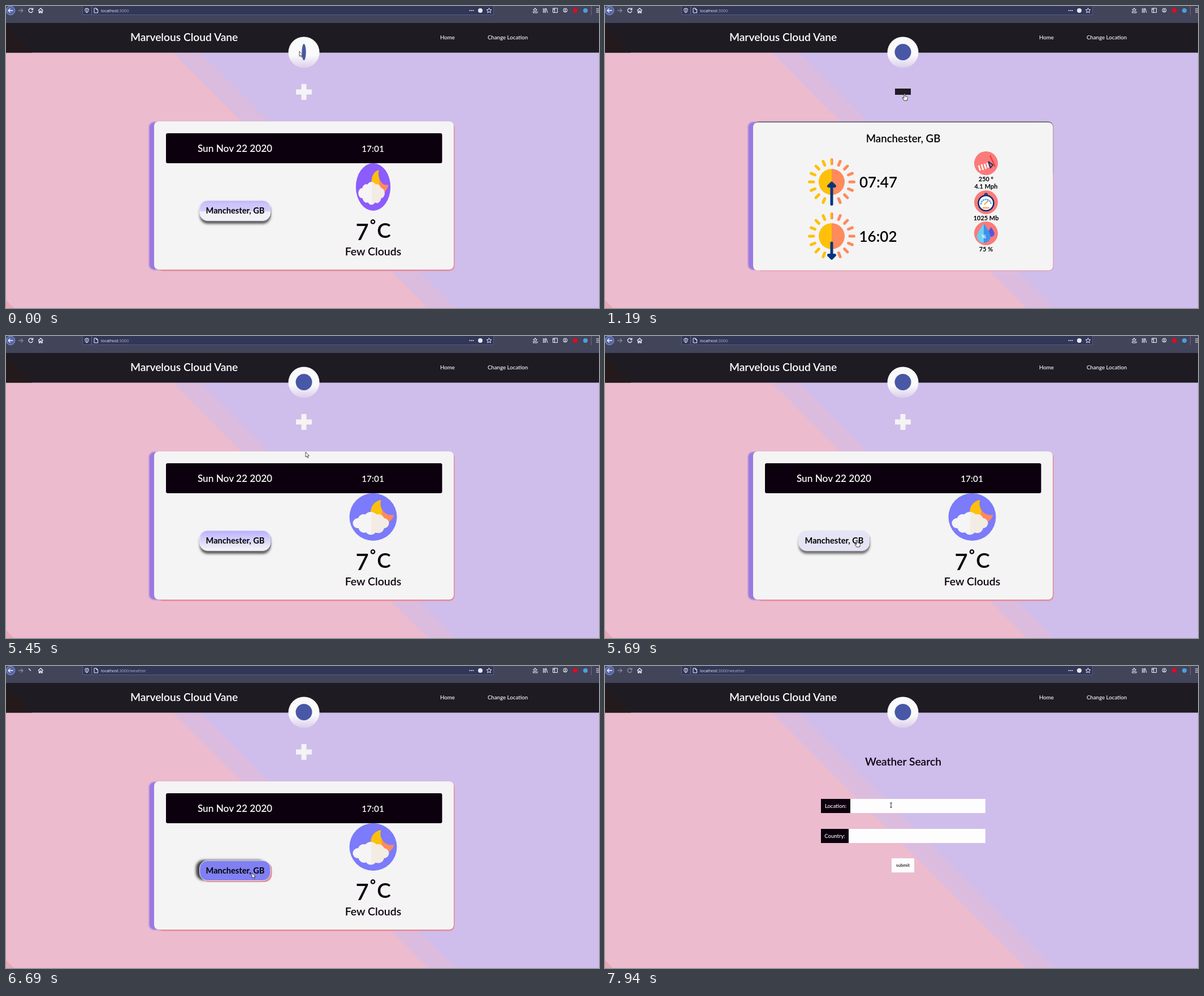
Write an HTML page that moves like this. It is 1049 px wide and 534 px high and loops after 8 s.

```html
<!DOCTYPE html>
<html lang="en">
<head>
<meta charset="utf-8">
<title>Weather app</title>
<style>
  html, body { margin: 0; width: 100%; height: 100%; overflow: hidden; background: #cfbdeb; }
  svg { display: block; width: 1049px; height: 534px; font: 600 11px Lato, sans-serif; }
  text { text-anchor: middle; white-space: pre; }
  .left { text-anchor: start; }
  .line { fill: none; stroke: #f4f4fa; stroke-width: 1.3; stroke-linejoin: round; }
  .bold { font-weight: 700; }
</style>
</head>
<body>
<svg viewBox="0 0 1049 534">
  <defs>
    <linearGradient id="disc" x2="0" y2="1">
      <stop offset=".6" stop-color="#fafafa"/><stop offset="1" stop-color="#dacdec"/>
    </linearGradient>
    <linearGradient id="fadeShort" x2="0" y2="1">
      <stop stop-color="#bdb3fa"/><stop offset=".15" stop-color="#cbc3fb"/>
      <stop offset=".5" stop-color="#d3ccfa"/><stop offset=".58" stop-color="#f2f1f6"/>
    </linearGradient>
    <linearGradient id="fadeLong" x2="0" y2="1">
      <stop stop-color="#b9b0ff"/><stop offset=".9" stop-color="#f2f1f5"/>
    </linearGradient>
    <linearGradient id="moonFill" gradientUnits="userSpaceOnUse" x1="15" x2="15.1" y1="0" y2="0">
      <stop stop-color="#ffbf0b"/><stop offset="1" stop-color="#ff8a5c"/>
    </linearGradient>
    <linearGradient id="cloudFill" gradientUnits="userSpaceOnUse" x1="-4" x2="-3.9" y1="0" y2="0">
      <stop stop-color="#f5f5f5"/><stop offset="1" stop-color="#f3ece4"/>
    </linearGradient>
    <linearGradient id="sunFill" gradientUnits="userSpaceOnUse" x1="0" x2=".1" y1="0" y2="0">
      <stop stop-color="#ffc00a"/><stop offset="1" stop-color="#ff8a5c"/>
    </linearGradient>
    <filter id="soft" x="-20%" y="-40%" width="140%" height="180%"><feGaussianBlur stdDeviation="2"/></filter>
    <filter id="softer"><feGaussianBlur stdDeviation="1"/></filter>
    <g id="sun" fill="url(#sunFill)" stroke="url(#sunFill)">
      <circle r="23" stroke="none"/>
      <path id="rays" stroke-width="5" stroke-linecap="round"/>
    </g>
  </defs>

  <!-- striped backdrop -->
  <path fill="#cfbdeb" d="M0 0H1049V534H0Z"/>
  <path fill="#dcbcde" d="M0 30H291L795 534H0Z"/>
  <path fill="#ecbbce" d="M0 30H242L746 534H0Z"/>
  <path fill="#e8a8b5" d="M0 520L14 534H0Z"/>

  <!-- browser bar -->
  <path fill="#42445a" d="M0 0H1049V30H0Z"/>
  <path fill="#333757" stroke="#555b8c" d="M135.5-1H862.5V15.5H135.5Z"/>
  <circle cx="8" cy="8" r="7.8" fill="#5666a5" stroke="#8795d8"/>
  <g class="line">
    <path d="M12.5 8H4M7.5 4.5L4 8L7.5 11.5"/>
    <path stroke="#85879a" d="M22 8H30M26.5 4.5L30 8L26.5 11.5"/>
    <path id="reload" d="M46.5 5.2A3.7 3.7 0 1 0 47.5 8.5M47.6 3.5V6.5H44.6"/>
    <path id="spinner" d="M40 4.5L44 8.5"/>
    <path d="M57 8L61.3 4L65.6 8M58.5 8V12H60.3V9H62.3V12H64.2V8"/>
    <g stroke-width="1">
      <path d="M140 5L143 4L146 5V8Q145.500 10.500 143 12Q140.500 10.500 140 8ZM143 5V11"/>
      <path stroke="#666b99" d="M151.500 0V15"/>
      <path d="M156 4H160L162.500 6.500V12H156ZM160 4V6.500H162"/>
      <path d="M854.500 3.500L855.800 6.400L858.800 6.700L856.500 8.800L857.200 12L854.500 10.300L851.800 12L852.500 8.800L850.200 6.700L853.200 6.400Z"/>
      <path d="M936 3.500L937 6H939.500L937.500 8L938 10L936 9L934 10L934.500 8L932.500 6H935ZM932.500 9.500V12H940V9.500"/>
      <path d="M950.500 4V12M952.500 4V12M954.500 4V12M955.500 4L958 12"/>
      <path d="M967.500 4H975.500V11.500H967.500ZM970.500 4V11.500M967.500 6H970.500"/>
      <circle cx="989.300" cy="7.500" r="3.500"/><circle cx="989.300" cy="6.700" r="1"/>
      <path d="M987 10Q989.300 7.500 991.500 10M1044 5H1049M1044 8H1049M1044 11H1049"/>
      <path stroke="#8d5e75" d="M1035.500 0V16"/>
    </g>
  </g>
  <g fill="#e8e8f0">
    <circle cx="820.500" cy="8" r="1"/><circle cx="823.500" cy="8" r="1"/><circle cx="826.500" cy="8" r="1"/>
    <circle cx="839" cy="8" r="4"/>
  </g>
  <circle cx="1007" cy="8" r="4" fill="#e5081c"/>
  <circle cx="1025" cy="8" r="4" fill="#4b9fdb"/>
  <text class="left" x="168" y="11" style="font:7.3px 'Open Sans',sans-serif" fill="#f0f0f6">localhost<tspan fill="#a9abc0">:3000<tspan id="path"></tspan></tspan></text>

  <!-- site header -->
  <path fill="#1e1b23" d="M0 30H1049V82.500H0Z"/>
  <path fill="#241a1c" d="M0 36L46 82.500H0Z"/>
  <g fill="#fff">
    <text class="left" x="220" y="62" font-size="19.200">Marvelous Cloud Vane</text>
    <g font-size="9.700" font-weight="500">
      <text x="781" y="59">Home</text>
      <text x="887.500" y="59">Change Location</text>
    </g>
  </g>
  <circle cx="527" cy="82" r="27.500" fill="url(#disc)"/>
  <ellipse id="emblem" cx="527" cy="81.500" ry="14.500" fill="#4858a6"/>

  <g id="card">
    <rect x="253" y="205" width="520" height="261.500" rx="9" fill="#9a7ae0" filter="url(#softer)"/>
    <rect x="268" y="206" width="525.500" height="262.500" rx="9" fill="#e58c98"/>
  </g>

  <g id="home">
    <path fill="#f4f4f4" d="M522.500 138H531.500V147.500H541V156.500H531.500V166H522.500V156.500H513V147.500H522.500Z"/>
    <rect x="262" y="204" width="530" height="262" rx="8" fill="#f4f4f4"/>
    <rect x="283" y="225" width="488.500" height="53" rx="3" fill="#0d000e"/>
    <g fill="#f7f7f7">
      <text x="405" y="257.500" font-size="17.200">Sun Nov 22 2020</text>
      <text x="649" y="257.500" font-size="15.400">17:01</text>
    </g>
    <g id="restShadow">
      <rect x="343" y="349" width="125" height="36" rx="14" fill="#555" filter="url(#soft)"/>
      <rect x="344" y="346" width="125" height="35.500" rx="14" fill="#77757c"/>
    </g>
    <g id="hoverShadow">
      <rect x="336" y="343" width="124" height="36" rx="14" fill="#444" filter="url(#soft)"/>
      <rect x="345" y="346" width="125.500" height="36" rx="14" fill="#e58b8b"/>
    </g>
    <rect id="button" x="342.500" y="344" width="125.500" height="35.500" rx="14" stroke="#e9e6f3"/>
    <text class="bold" x="405.500" y="366.500" font-size="14.600">Manchester, GB</text>
    <g id="weather">
      <circle id="sky" r="42"/>
      <path fill="url(#moonFill)" d="M14-30A21 21 0 1 0 37-4A20 20 0 0 1 14-30Z"/>
      <g id="cloud" fill="url(#cloudFill)"></g>
    </g>
    <g fill="#0d000e">
      <text x="630" y="413.500" font-size="40">7</text>
      <circle cx="649" cy="381.500" r="3.200" fill="none" stroke="#0d000e" stroke-width="2.200"/>
      <text x="668.500" y="409.500" font-size="37">C</text>
      <text x="649.500" y="441" font-size="19.500">Few Clouds</text>
    </g>
  </g>

  <g id="detail">
    <path fill="#201c24" d="M513 146H541V157H513Z"/>
    <rect x="263" y="204" width="530" height="100" rx="9" fill="#77737f"/>
    <rect x="262" y="206" width="530.500" height="261.500" rx="8" fill="#f4f4f4"/>
    <text x="527.500" y="240.500" font-size="18.600">Manchester, GB</text>
    <use href="#sun" x="401" y="311"/>
    <use href="#sun" x="401" y="407"/>
    <g fill="none" stroke="#05357f" stroke-width="5" stroke-linecap="round" stroke-linejoin="round">
      <path d="M401 350.500V314M395.500 318.500L401 313L406.500 318.500Z"/>
      <path d="M401 419V446M395.500 440.500L401 446L406.500 440.500Z"/>
    </g>
    <g font-size="26">
      <text x="483.500" y="321">07:47</text>
      <text x="483" y="417">16:02</text>
    </g>
    <g fill="#fb7b7a">
      <circle cx="674" cy="278" r="21"/><circle cx="674" cy="347" r="21"/><circle cx="674" cy="402" r="21"/>
    </g>
    <path fill="none" stroke="#fff" stroke-width="2.600" d="M661 282L664 291M666 280L669 290M671 279L674 288M676 277L678 286"/>
    <path fill="none" stroke="#1b2e68" stroke-width="2" d="M678 275L686 281L682 286L678 275"/>
    <path stroke="#ef343c" stroke-width="2" d="M681 264L690 284"/>
    <circle cx="674" cy="333.500" r="2" fill="none" stroke="#0b2c6b" stroke-width="2"/>
    <circle cx="674" cy="348.500" r="13.500" fill="#fff" stroke="#0b2c6b" stroke-width="2.500"/>
    <path fill="none" stroke="#4aa6f5" stroke-width="2.500" stroke-dasharray="3 1" d="M665 351A9 9 0 1 1 683 351"/>
    <path stroke="#ff9a3c" stroke-width="2" d="M671 351L678 344M668 357H680"/>
    <path fill="#5457d8" d="M683 391Q688 398 689 402A5.500 5.500 0 0 1 677 402Q678 398 683 391Z"/>
    <path fill="#6bd0f3" d="M670 385Q658 401 658 408A12 12 0 0 0 670 419Z"/>
    <path fill="#3c93ef" d="M670 385Q682 401 682 408A12 12 0 0 1 670 419Z"/>
    <text class="bold" x="670" y="411" font-size="10" fill="#fff">%</text>
    <g class="bold">
      <text x="674" y="310">250 °</text>
      <text x="674" y="323">4.1 Mph</text>
      <text x="674" y="378.500">1025 Mb</text>
      <text x="674" y="434">75 %</text>
    </g>
  </g>

  <g id="search">
    <text x="527.500" y="175.500" font-size="19.200" fill="#0d000e">Weather Search</text>
    <path fill="#fdfdfd" d="M382 235H673V260H382ZM382 288H673V313H382ZM507 340H547V365H507Z"/>
    <path fill="#0d000e" d="M382 235H434V260H382ZM382 288H431V313H382Z"/>
    <g font-size="9.500" fill="#fff" font-weight="500">
      <text x="408" y="251">Location:</text>
      <text x="406.500" y="303.500">Country:</text>
    </g>
    <text x="527" y="355" font-size="8" font-weight="500">submit</text>
  </g>

  <g id="cursor">
    <path id="arrow" fill="#fff" stroke="#222" stroke-width=".8" d="M0 0V9L2.100 7.300L3.600 10.500L5 9.900L3.600 6.800H6.300Z"/>
    <path id="hand" fill="#fff" stroke="#222" stroke-width=".9" d="M-1 1A1 1 0 0 1 1 1V4.500L4.500 5.500Q5.600 6 5.500 7.500L4.500 12H-1L-4 7.500Q-3.500 6-1 8Z"/>
    <path id="beam" fill="none" stroke="#222" stroke-width="1" d="M-1.800-4H1.800M0-4V4M-1.800 4H1.800"/>
  </g>
</svg>
<script>
  const LOOP = 8000;
  const el = {};
  document.querySelectorAll('[id]').forEach(node => el[node.id] = node);

  const set = (id, attrs) => Object.entries(attrs).forEach(([k, v]) => el[id].setAttribute(k, v));
  const show = (id, on) => el[id].style.display = on ? '' : 'none';
  const mix = (a, b, k) => `rgb(${a.map((v, i) => Math.round(v + (b[i] - v) * k))})`;
  // latest [time, ...values] entry reached at t
  const at = (track, t) => track.filter(step => step[0] <= t).pop();

  set('rays', {
    d: Array.from({ length: 16 }, (_, i) => {
      const a = i * Math.PI / 8, p = r => `${r * Math.sin(a)} ${-r * Math.cos(a)}`;
      return i === 8 ? '' : `M${p(32)}L${p(39.5)}`;
    }).join('')
  });
  el.cloud.innerHTML = [[-27, 11, 9], [-17, 5, 10], [-4, 4, 13], [9, 6, 11], [19, 11, 9],
    [-16, 18, 10], [-4, 21, 10.5], [9, 18, 10.5]]
    .map(([x, y, r]) => `<circle cx="${x}" cy="${y}" r="${r}"/>`).join('');

  const cursorTrack = [
    [0, 'arrow', 519, 80], [750, 'hand', 530, 155],
    [5450, 'arrow', 530, 205], [5570, 'arrow', 458, 335], [5690, 'hand', 446, 361],
    [6450, 'hand', 441, 364], [6690, 'arrow', 435, 366], [7100, 'arrow', 438, 364],
    [7250, 'arrow', 503, 268], [7390, 'beam', 503, 248], [7540, 'beam', 503, 238],
    [7660, 'beam', 504, 245], [7940, 'beam', 506, 246]
  ];
  const hoverTrack = [[0, 0], [5690, .12], [5810, .4], [5930, .75], [6050, 1]];

  function draw(t) {
    const searching = t >= 6810, detailed = t >= 1190 && t < 4640;
    show('card', !searching);
    show('home', !searching && !detailed);
    show('detail', detailed);
    show('search', searching);

    const loading = t >= 6690;
    el.path.textContent = loading ? '/weather' : '';
    show('spinner', loading && !searching);
    show('reload', !loading || searching);
    el.reload.style.stroke = searching ? '#9092a5' : '';

    const spin = Math.min(1, Math.floor(t / 120) / 5);
    set('emblem', { rx: 14.5 * (.25 + .75 * spin) });
    set('weather', { transform: `translate(649.5 320) scale(${.73 + .27 * spin} 1)` });
    set('sky', { fill: mix([140, 92, 252], [123, 123, 251], spin) });

    const hover = at(hoverTrack, t)[1];
    set('button', {
      fill: hover ? mix([243, 242, 245], [128, 128, 242], hover)
        : t < 1190 ? 'url(#fadeShort)' : 'url(#fadeLong)'
    });
    set('restShadow', { opacity: 1 - hover });
    set('hoverShadow', { opacity: hover < .2 ? 0 : hover });

    const [, kind, x, y] = at(cursorTrack, t);
    set('cursor', { transform: `translate(${x} ${y})` });
    ['arrow', 'hand', 'beam'].forEach(id => show(id, id === kind));
  }

  const start = performance.now();
  (function tick() {
    draw((performance.now() - start) % LOOP);
    requestAnimationFrame(tick);
  })();
</script>
</body>
</html>
```
